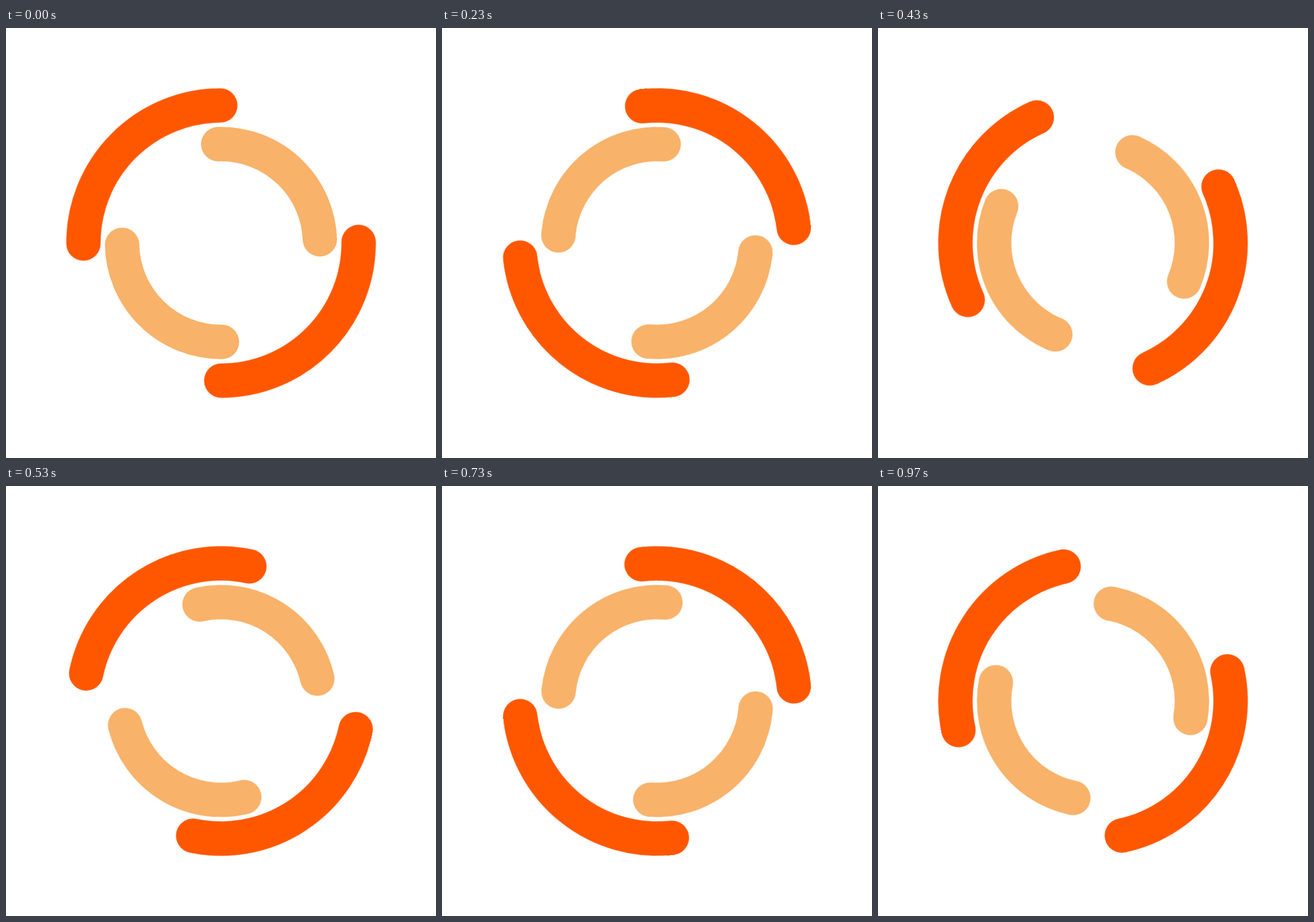
Animation, 748 px wide and 748 px high, one loop 1 s. Source, as an HTML page:

```html
<!DOCTYPE html>
<html lang="en">
<head>
<meta charset="utf-8">
<title>Double ring spinner</title>
<style>
  html, body {
    margin: 0;
    width: 100%;
    height: 100%;
    overflow: hidden;
    background: #fff;
  }
  svg {
    display: block;
    width: 100%;
    height: 100%;
  }
  .ring {
    fill: none;
    stroke-width: 8;
    stroke-linecap: round;
    stroke-dasharray: 1;
    transform-origin: 50px 50px;
    /* ten coarse steps per turn, each split into three fine ones */
    animation: turn 1s steps(10) -0.5ms infinite,
               tick 100ms step-end -0.5ms infinite;
  }
  .outer { --way: 1; stroke: #ff5700; }
  .inner { --way: -1; stroke: #f8b26a; stroke-dashoffset: 1; }

  @keyframes turn {
    from { rotate: 0deg; }
    to { rotate: calc(var(--way) * 360deg); }
  }
  @keyframes tick {
    0% { transform: rotate(0deg); }
    30% { transform: rotate(calc(var(--way) * 12deg)); }
    70% { transform: rotate(calc(var(--way) * 24deg)); }
    100% { transform: rotate(calc(var(--way) * 36deg)); }
  }
</style>
</head>
<body>
<svg viewBox="0 0 100 100">
  <circle class="ring outer" cx="50" cy="50" r="32" pathLength="4"/>
  <circle class="ring inner" cx="50" cy="50" r="23" pathLength="4"/>
</svg>
</body>
</html>
```
